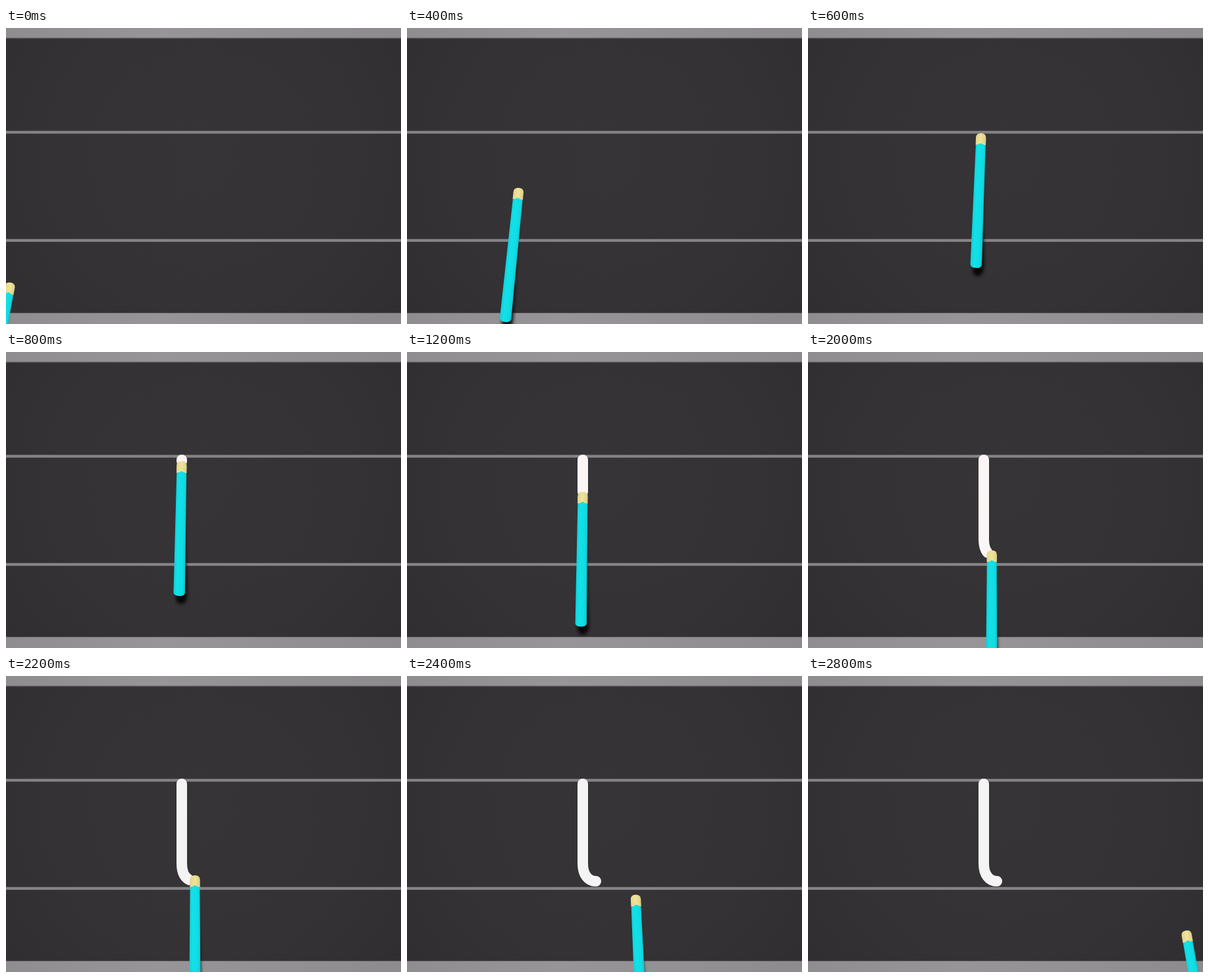
An HTML page that plays this animation: 600 by 450 pixels, repeating every 3 s.

```html
<!DOCTYPE html>
<html lang="en">
<head>
<meta charset="utf-8">
<title>Writing a letter</title>
<style>
  html, body { margin: 0; width: 100%; height: 100%; overflow: hidden; background: #343234; }
  svg { display: block; width: 100%; height: 100%; }
</style>
</head>
<body>
<svg viewBox="0 0 600 450" preserveAspectRatio="none">
  <defs>
    <radialGradient id="board" gradientUnits="userSpaceOnUse" cx="300" cy="200" r="380">
      <stop offset="0" stop-color="#363436"/>
      <stop offset=".6" stop-color="#343234"/>
      <stop offset="1" stop-color="#302e30"/>
    </radialGradient>
    <linearGradient id="frame">
      <stop offset="0" stop-color="#8f8d8f"/>
      <stop offset=".4" stop-color="#979597"/>
      <stop offset="1" stop-color="#8d8b8d"/>
    </linearGradient>
    <linearGradient id="paint">
      <stop offset="0" stop-color="#10cfd8"/>
      <stop offset=".3" stop-color="#14e0e8"/>
      <stop offset=".75" stop-color="#10dce4"/>
      <stop offset="1" stop-color="#0cc4ce"/>
    </linearGradient>
    <linearGradient id="wood">
      <stop offset="0" stop-color="#e2d68c"/>
      <stop offset=".5" stop-color="#efe39c"/>
      <stop offset="1" stop-color="#dccf86"/>
    </linearGradient>
    <filter id="soft" x="-100%" y="-10%" width="300%" height="120%">
      <feGaussianBlur stdDeviation="2.4"/>
    </filter>
  </defs>

  <rect width="600" height="450" fill="url(#board)"/>
  <g fill="url(#frame)">
    <rect width="600" height="15"/>
    <rect y="433.3" width="600" height="17"/>
  </g>
  <rect y="14.8" width="600" height="1.4" fill="#5c5a5c"/>
  <g fill="#858385">
    <rect y="156.4" width="600" height="4.2"/>
    <rect y="320.8" width="600" height="4.3"/>
  </g>

  <path id="ink" d="M267 164V285C267 302 275 312 287 312" fill="none"
        stroke-width="16" stroke-linecap="round"/>

  <g id="pencil">
    <path d="M3 30L12 201Q12 217 3 217T-5 201z" fill="#000" opacity=".85" filter="url(#soft)"/>
    <path d="M-7.7 18V7Q-7.7 0 0 0T7.7 7V18z" fill="url(#wood)"/>
    <path d="M-7.4 18L-3.5 17L0 15L3.5 17L7.4 18L8.7 200Q8 205 0 205T-8.7 200z" fill="url(#paint)"/>
  </g>
</svg>

<script>
const STEP = 200, STEPS = 15;
const TOUCH = 4, LIFT = 11;       // steps at which the tip meets and leaves the board
const START = 11, SPEED = 23.3;   // pen travel along the letter
const REACH = 9;                  // from the pencil's top to the centre of its tip
const ink = document.getElementById('ink');
const pencil = document.getElementById('pencil');
const total = ink.getTotalLength();

const entry = [
  { at: 0, x: 7, y: 387, lean: 10.5 },
  { at: 1, x: 77, y: 326, lean: 9.5 },
  { at: 3, x: 263, y: 160, lean: 2.2 },
  { at: TOUCH, x: 267, y: 166, lean: 1.1 }
];
const lerp = (a, b, u) => a + (b - a) * u;
const smooth = u => u * u * (3 - 2 * u);
const smoother = u => u ** 3 * (u * (6 * u - 15) + 10);

function enter(step) {
  const i = entry.findIndex(key => key.at > step);
  const a = entry[i - 1], b = entry[i], u = (step - a.at) / (b.at - a.at);
  return { x: lerp(a.x, b.x, u), y: lerp(a.y, b.y, u), lean: lerp(a.lean, b.lean, u), length: 0 };
}

function write(step) {
  const travel = Math.min(total, START + SPEED * (step - TOUCH));
  const point = ink.getPointAtLength(travel);
  const lean = lerp(1.1, 0, (step - TOUCH) / (LIFT - TOUCH));
  return { x: point.x, y: point.y - REACH, lean, length: travel - REACH };
}

function leave(step) {
  const u = (step - LIFT) / (STEPS - 1 - LIFT), ease = smoother(u);
  return {
    x: lerp(287, 574, ease),
    y: lerp(303, 387, ease ** .67),
    lean: -10 * smooth(u),
    length: total + 1
  };
}

function draw(time) {
  const step = Math.floor(time / STEP) % STEPS;
  const phase = step < TOUCH ? enter : step <= LIFT ? write : leave;
  const { x, y, lean, length } = phase(step);
  pencil.setAttribute('transform', `translate(${x} ${y}) rotate(${lean})`);
  ink.setAttribute('visibility', length > 0 ? 'visible' : 'hidden');
  ink.setAttribute('stroke-dasharray', `${length} 999`);
  ink.setAttribute('stroke', step < LIFT ? '#fbf5f5' : '#f5f4f4');
}

const start = performance.now();
function tick() {
  draw(performance.now() - start);
  requestAnimationFrame(tick);
}
tick();
</script>
</body>
</html>
```
